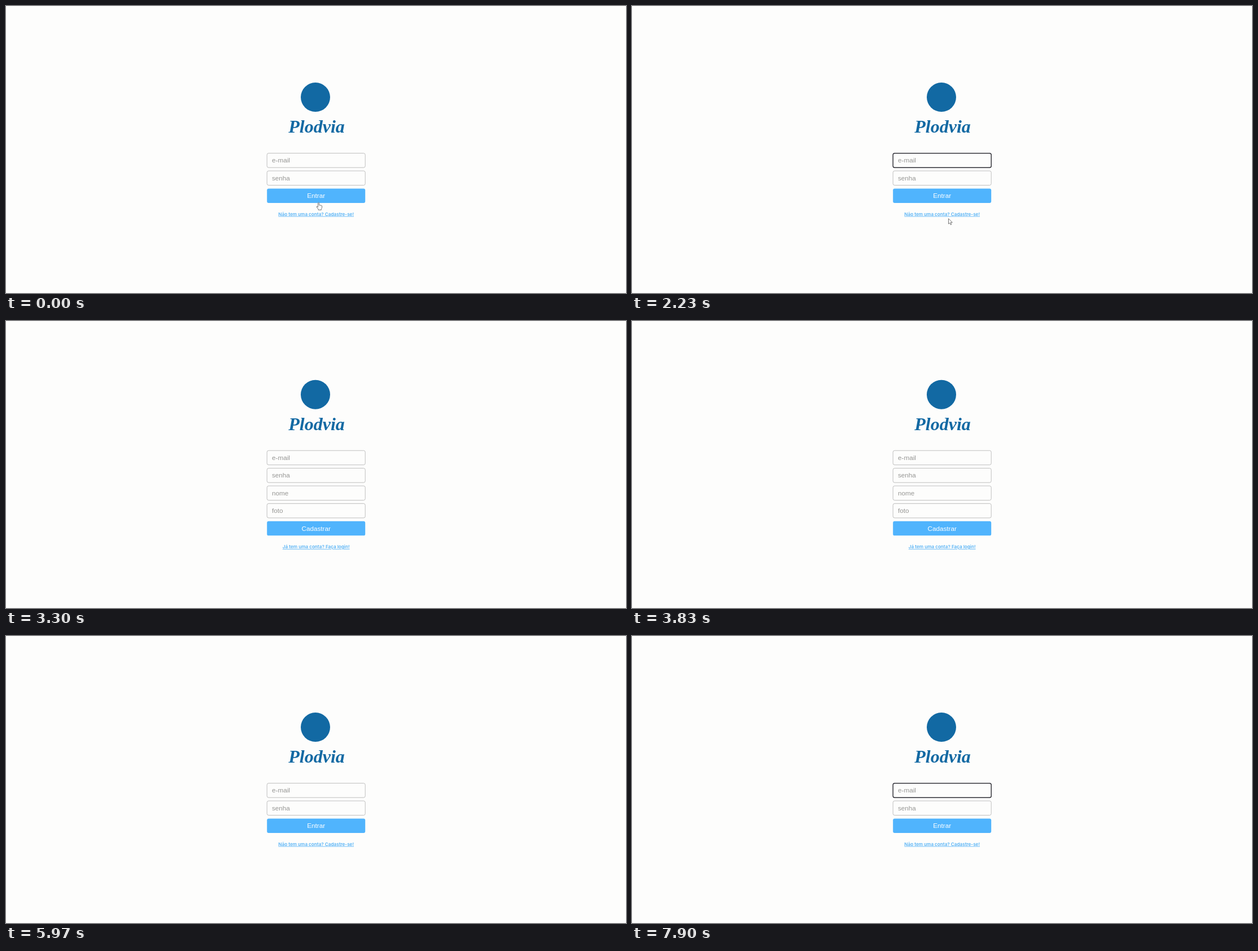
An HTML page for the animation above (8000 ms loop, 1098 by 510 pixels).

```html
<!DOCTYPE html>
<html lang="pt-BR">
<head>
<meta charset="utf-8">
<title>Plodvia</title>
<style>
  html, body { margin: 0; width: 100%; height: 100%; overflow: hidden; background: #fdfdfc; }
  svg { display: block; width: 100%; height: 100%; }
  .brand { font: italic bold 32px "Liberation Serif", serif; fill: #1269a3; text-anchor: middle; }
  .field { fill: none; stroke: #b4b4b4; stroke-width: .85; }
  .focus { fill: none; stroke: #14141c; stroke-width: 1.2; }
  .hint, .action { font: 11.7px "Liberation Sans", sans-serif; }
  .hint { fill: #969694; }
  .button { fill: #50b4fd; }
  .action { fill: #fff; text-anchor: middle; }
  .link { font: 600 8.15px Inter, sans-serif; fill: #55b2f5; text-anchor: middle; text-decoration: underline; }
  .cursor { fill: #fff; stroke: #555; stroke-width: .8; stroke-linejoin: round; }
</style>
</head>
<body>
<svg id="stage" viewBox="0 0 1098 510" preserveAspectRatio="none"></svg>
<script>
const LOOP = 8000, CENTER = 549.2, WIDTH = 174, HEIGHT = 25.5, STEP = 31.4, BLINK = 533;
const LEFT = CENTER - WIDTH / 2;
const SIGNUP_OPEN = 2670, SIGNUP_CLOSE = 5530;
const stage = document.getElementById('stage');

const pages = {
  login: { fields: ['e-mail', 'senha'], action: 'Entrar',
    link: 'Não tem uma conta? Cadastre-se!', linkWidth: 135 },
  signup: { fields: ['e-mail', 'senha', 'nome', 'foto'], action: 'Cadastrar',
    link: 'Já tem uma conta? Faça login!', linkWidth: 122 },
};

// The column is centred, so each extra field raises the top by half a row.
for (const page of Object.values(pages)) {
  page.top = 293 - page.fields.length * STEP / 2;
  page.buttonY = page.top + page.fields.length * STEP;
}

const box = (cls, y) =>
  `<rect class="${cls}" x="${LEFT}" y="${y}" width="${WIDTH}" height="${HEIGHT}" rx="2.9"/>`;
const label = (cls, x, y, text) => `<text class="${cls}" x="${x}" y="${y}">${text}</text>`;

function pageMarkup(id, { top, buttonY, fields, action, link }) {
  const rows = fields.map((text, i) => {
    const y = top + i * STEP;
    return box('field', y) + label('hint', 471, y + 16.6, text);
  });
  return `<g id="${id}">
    <circle cx="548" cy="${top - 99.5}" r="26" fill="#1269a3"/>
    ${label('brand', 550, top - 36.5, 'Plodvia')}
    ${rows.join('')}
    ${box('button', buttonY)}
    ${label('action', CENTER, buttonY + 16.9, action)}
    ${label('link', CENTER, buttonY + 48.2, link)}
  </g>`;
}

const emailY = pages.login.top;
stage.innerHTML = `
  ${Object.entries(pages).map(([id, page]) => pageMarkup(id, page)).join('')}
  <g id="focus">${box('focus', emailY)}</g>
  <path id="caret" d="M471.5 ${emailY + 6}v13.4" stroke="#222" stroke-width=".8"/>
  <path id="arrow" class="cursor" d="M0 0V9.4L2.2 7.5 3.7 11 5.3 10.3 3.8 6.9H6.8Z"/>
  <path id="hand" class="cursor" d="M-1 1Q0-.6 1 1V5L4.6 5.2 6 6V9.6L4.8 11.6V13.4H-.4V12L-3.6 8Q-3.4 6.6-2.2 7.4L-1 8.4Z"/>`;

const part = Object.fromEntries(['login', 'signup', 'focus', 'caret', 'arrow', 'hand']
  .map(id => [id, document.getElementById(id)]));

// Pointer moves: each one eases to a resting place, bowed sideways by some pixels.
const home = { x: 553.5, y: 349 };
const moves = [
  { start: 30, end: 370, x: 538, y: 221, bow: 95 },
  { start: 530, end: 830, x: 452, y: 287, bow: 25 },
  { start: 1000, end: 1130, x: 466, y: 278, bow: 0 },
  { start: 1930, end: 2230, x: 560.5, y: 377.8, bow: 0 },
  { start: 2230, end: 2500, x: 563, y: 369, bow: -8 },
  { start: 2870, end: 3270, x: 550, y: 308, bow: 0 },
  { start: 3830, end: 4630, x: 533.8, y: 400.4, bow: 0 },
  { start: 5530, end: 5940, x: 540, y: 276, bow: 0 },
];

const smooth = k => k * k * (3 - 2 * k);

function pointerAt(t) {
  let from = home;
  for (const to of moves) {
    if (t < to.start) break;
    if (t < to.end) {
      const k = smooth((t - to.start) / (to.end - to.start));
      const dx = to.x - from.x, dy = to.y - from.y;
      const side = to.bow * Math.sin(Math.PI * k) / Math.hypot(dx, dy);
      return { x: from.x + dx * k + dy * side, y: from.y + dy * k - dx * side };
    }
    from = to;
  }
  return from;
}

// Text fields show no pointer; the button and the link show a hand.
function pointerKind({ top, buttonY, fields, linkWidth }, { x, y }) {
  const row = Math.floor((y - top) / STEP), within = y - top - row * STEP;
  if (Math.abs(x - CENTER) <= WIDTH / 2 && row >= 0 && within <= HEIGHT) {
    if (row < fields.length) return 'none';
    if (row === fields.length) return 'hand';
  }
  const onLink = Math.abs(x - CENTER) < linkWidth / 2 && Math.abs(y - buttonY - 45.5) < 6;
  return onLink ? 'hand' : 'arrow';
}

const show = (name, on) => part[name].setAttribute('visibility', on ? 'visible' : 'hidden');

function draw(t) {
  const current = t >= SIGNUP_OPEN && t < SIGNUP_CLOSE ? 'signup' : 'login';
  const clicked = t < SIGNUP_OPEN ? 1570 : 6300;
  const focused = t >= clicked;
  show('login', current === 'login');
  show('signup', current === 'signup');
  show('focus', focused);
  show('caret', focused && Math.floor((t - clicked) / BLINK) % 2 === 0);

  const tip = pointerAt(t), kind = pointerKind(pages[current], tip);
  for (const name of ['arrow', 'hand']) {
    show(name, kind === name);
    part[name].setAttribute('transform', `translate(${tip.x} ${tip.y})`);
  }
}

const start = performance.now();
function tick() {
  draw((performance.now() - start) % LOOP);
  requestAnimationFrame(tick);
}
tick();
</script>
</body>
</html>
```
